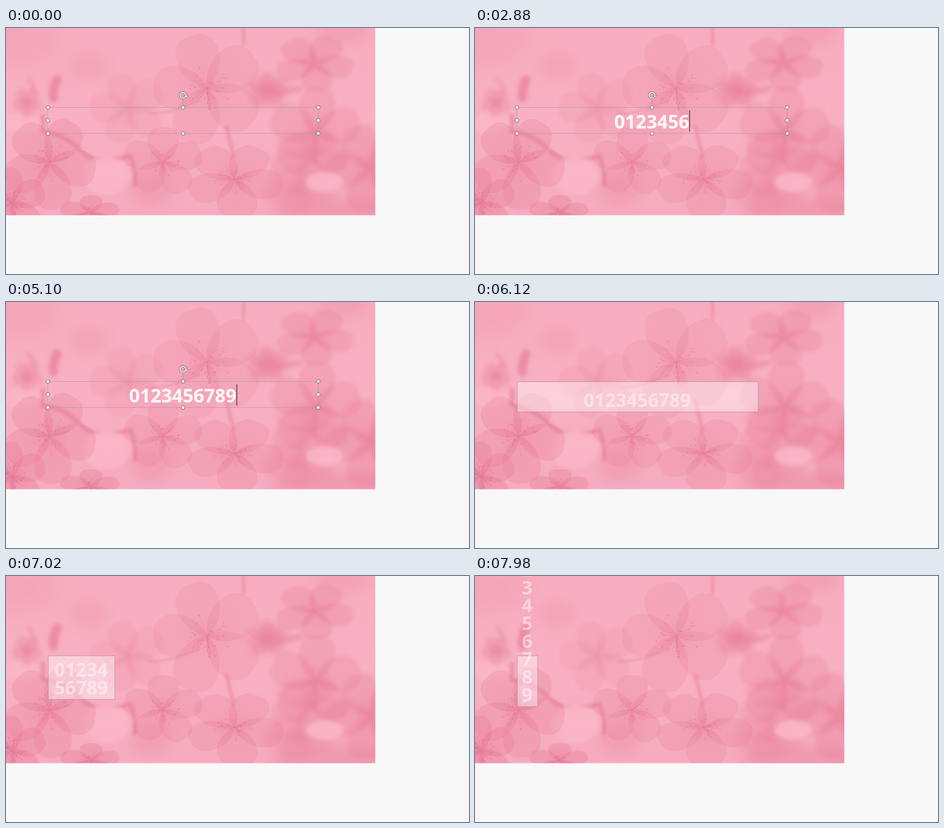
These frames come from a looping animation (1025 by 546 pixels, 8000 ms). An HTML page with a canvas:

```html
<!DOCTYPE html>
<html lang="en">
<head>
<meta charset="utf-8">
<title>Text box wrapping</title>
<style>
  html, body { margin: 0; width: 100%; height: 100%; overflow: hidden; background: #f8f8f8; }
  canvas, svg { position: absolute; left: 0; top: 0; display: block; }
  text { font: bold 41.6px "Open Sans", "Noto Sans", sans-serif; text-anchor: middle; fill: #fffbfb; }
</style>
</head>
<body>
<canvas id="photo" width="818" height="416"></canvas>
<svg width="1025" height="546" viewBox="0 0 1025 546">
  <g id="frame" fill="none" stroke="#a99aa0">
    <rect x="92.5" y="176.5" width="599" height="57.5" stroke-width=".9"/>
    <path d="M392 157V176"/>
    <g id="handles" fill="#fff" stroke="#85787d" stroke-width="1.5"></g>
    <circle cx="391.7" cy="149.3" r="6.3" stroke="#7d7477" stroke-width="4.4"/>
    <circle cx="391.7" cy="149.3" r="6.3" stroke="#fff" stroke-width="2"/>
    <path d="M393.5 149.3H403L398.3 154.3Z" fill="#fff" stroke="#7d7477"/>
  </g>
  <rect id="ghost" x="93.5" y="177" fill="#fff" fill-opacity=".4" stroke="#b48d98"/>
  <g id="lines"></g>
  <rect id="caret" y="183" width="1.5" height="47"/>
</svg>
<script>
const $ = id => document.getElementById(id);

// Soft blossom background
const ctx = $('photo').getContext('2d');
const ROSE = a => `rgba(230,122,149,${a})`;
const LIGHT = 'rgba(250,182,199,.9)';
let seed = 7;
const random = () => (seed = seed * 16807 % 2147483647) / 2147483647;

function glow(x, y, rx, ry, color, blur) {
  ctx.filter = `blur(${blur}px)`;
  ctx.fillStyle = color;
  ctx.beginPath();
  ctx.ellipse(x, y, rx, ry, 0, 0, 7);
  ctx.fill();
}

function branch(d, width, alpha, blur = 3) {
  ctx.filter = `blur(${blur}px)`;
  ctx.strokeStyle = ROSE(alpha);
  ctx.lineWidth = width;
  ctx.lineCap = 'round';
  ctx.stroke(new Path2D(d));
}

function petalPath(length) {
  const side = .53 * length;
  const path = new Path2D();
  path.moveTo(0, 0);
  path.bezierCurveTo(.25 * length, -side, 1.08 * length, -side, length, 0);
  path.bezierCurveTo(1.08 * length, side, .25 * length, side, 0, 0);
  return path;
}

// Five petals shaded from a dark heart, with scattered stamens
function flower(x, y, r, { tilt = 0, squash = 1, blur = .7, strength = .4, stamens = 0 }) {
  const shade = ctx.createRadialGradient(0, 0, 0, 0, 0, r);
  shade.addColorStop(0, ROSE(strength));
  shade.addColorStop(.4, ROSE(strength * .62));
  shade.addColorStop(1, ROSE(strength * .5));
  ctx.save();
  ctx.translate(x, y);
  ctx.scale(1, squash);
  ctx.filter = `blur(${blur}px)`;
  ctx.lineWidth = 1;
  ctx.strokeStyle = ROSE(.1);
  ctx.fillStyle = shade;
  for (let i = 0; i < 5; i++) {
    ctx.save();
    ctx.rotate((tilt + 72 * i) * Math.PI / 180);
    const path = petalPath(r * (.96 + .08 * random()));
    ctx.fill(path);
    ctx.stroke(path);
    ctx.restore();
  }
  ctx.filter = 'blur(.5px)';
  for (let i = 0; i < stamens; i++) {
    const angle = random() * 2 * Math.PI, reach = r * (.08 + .34 * random());
    const px = reach * Math.cos(angle), py = reach * Math.sin(angle);
    ctx.strokeStyle = ROSE(.2);
    ctx.beginPath();
    ctx.moveTo(0, 0);
    ctx.lineTo(px, py);
    ctx.stroke();
    ctx.fillStyle = 'rgba(220,100,130,.45)';
    ctx.beginPath();
    ctx.arc(px, py, 1.5, 0, 7);
    ctx.fill();
  }
  ctx.restore();
}

function paintPhoto() {
  const base = ctx.createLinearGradient(0, 0, 0, 416);
  base.addColorStop(0, '#f7adbf');
  base.addColorStop(.5, '#f8b0c2');
  base.addColorStop(1, '#f6abbe');
  ctx.beginPath();
  ctx.rect(0, 0, 817.5, 415.5);
  ctx.clip();
  ctx.fillStyle = base;
  ctx.fillRect(0, 0, 818, 416);

  // Out of focus
  glow(20, 25, 95, 55, ROSE(.15), 22);
  glow(183, 85, 42, 30, ROSE(.18), 12);
  glow(745, 5, 60, 28, ROSE(.25), 16);
  glow(735, 405, 150, 28, ROSE(.35), 12);
  glow(320, 362, 44, 34, ROSE(.25), 12);
  glow(30, 212, 48, 22, LIGHT, 6);
  flower(270, 178, 80, { tilt: -106, blur: 3, strength: .25 });
  flower(47, 165, 32, { tilt: 20, blur: 5, strength: .55 });
  flower(578, 138, 46, { tilt: -20, squash: .85, blur: 7, strength: .8 });
  flower(645, 358, 80, { tilt: 20, squash: .6, blur: 9, strength: .5 });
  flower(808, 312, 95, { tilt: -112, blur: 5, strength: .55 });
  flower(682, 78, 85, { tilt: 12, squash: .72, blur: 3, strength: .5 });
  flower(670, 285, 85, { tilt: 10, squash: .75, blur: 5, strength: .35 });
  flower(685, 232, 100, { tilt: -86, blur: 3, strength: .45 });
  glow(705, 342, 42, 22, LIGHT, 5);
  branch('M105 155Q104 130 113 115', 20, .65, 4);
  branch('M62 142Q60 125 50 115', 8, .4, 4);
  branch('M82 195V230Q130 235 165 272T275 284Q290 320 285 350', 9, .6);
  branch('M526 0V38', 5, .6);
  branch('M318 190Q380 188 430 160', 4, .4, 2);
  branch('M488 220L504 285', 7, .55);
  branch('M600 145L650 135', 12, .45, 5);
  glow(222, 328, 52, 43, LIGHT, 4);

  // In focus
  flower(446, 133, 122, { tilt: 37, strength: .32, stamens: 36 });
  flower(347, 298, 85, { tilt: 55, squash: .9, strength: .42, stamens: 24 });
  flower(506, 336, 108, { tilt: 85, squash: .76, strength: .4, stamens: 36 });
  flower(97, 298, 105, { tilt: 12, strength: .48, stamens: 28 });
  flower(12, 388, 75, { tilt: -25, strength: .6, stamens: 32 });
  flower(188, 410, 66, { tilt: -90, squash: .6, strength: .6, stamens: 16 });
}
paintPhoto();

// Text box
const LOOP = 8000, STEP = 60, FOCUS = 780, BLINK = 3300, DRAG = 5880;
const LEFT = 93, RIGHT = 691, TOP = 177, BOTTOM = 234;
const ADVANCE = 23.77, LEADING = 39.7, PADDING = 28;

const set = (el, attrs) => { for (const k in attrs) el.setAttribute(k, attrs[k]); };
const show = (el, on) => { el.style.display = on ? '' : 'none'; };
function add(parent, tag, attrs = {}) {
  const el = document.createElementNS('http://www.w3.org/2000/svg', tag);
  set(el, attrs);
  return parent.appendChild(el);
}

for (let i = 0; i < 9; i++)
  if (i !== 4) add($('handles'), 'circle', { cx: 92.8 + i % 3 * 299.3, cy: 176.3 + Math.floor(i / 3) * 28.9, r: 3.9 });

const rows = Array.from({ length: 10 }, () => add($('lines'), 'text'));

// Digits arrive in three bursts of even rhythm
const burst = (start, count, gap) => Array.from({ length: count }, (_, i) => start + i * gap);
const keyTimes = [...burst(1440, 1, 0), ...burst(1680, 3, 150), ...burst(2460, 6, 168)];

// Pointer stops while dragging the corner: time, right edge, bottom edge
const dragPath = [[DRAG, RIGHT, BOTTOM], [6120, 627, 244], [6660, 391, 274],
  [7020, 241, 274], [7500, 174, 281], [7980, 139, 290]];

function dragAt(t) {
  const i = Math.max(1, dragPath.findIndex(stop => stop[0] >= t));
  const a = dragPath[i - 1], b = dragPath[i];
  const u = (t - a[0]) / (b[0] - a[0]);
  return [1, 2].map(k => a[k] + (b[k] - a[k]) * u);
}

function caretOpacity(t) {
  if (t < BLINK) return t < FOCUS ? 0 : 1;
  const wave = Math.cos(Math.PI * (t - 3255) / 510);
  return Math.min(1, Math.max(0, .5 + 2.5 * wave));
}

// The last line stays above the bottom edge; earlier lines stack upwards
function layText(text, perLine, right, bottom) {
  const count = Math.ceil(text.length / perLine);
  const center = (LEFT + right) / 2 - .7;
  rows.forEach((row, i) => {
    row.textContent = text.slice(i * perLine, (i + 1) * perLine);
    set(row, { x: center, y: bottom - 11.3 - Math.max(0, count - 1 - i) * LEADING });
  });
  return center;
}

function render(time) {
  const t = Math.floor(time % LOOP / STEP) * STEP;
  const dragging = t >= DRAG;
  const typed = keyTimes.filter(k => k <= t);
  const text = '0123456789'.slice(0, typed.length);
  show($('frame'), !dragging);
  show($('ghost'), dragging);
  show($('caret'), !dragging);
  set($('lines'), { opacity: dragging ? .5 : 1 });

  if (dragging) {
    const [right, bottom] = dragAt(t);
    const fit = Math.floor((right - LEFT - PADDING) / ADVANCE);
    set($('ghost'), { width: right - LEFT - .5, height: bottom - TOP });
    layText(text, Math.min(10, Math.max(1, fit)), right, bottom);
  } else {
    const center = layText(text, 10, RIGHT, BOTTOM);
    const moving = t - typed[typed.length - 1] < STEP;
    set($('caret'), {
      x: center + typed.length * ADVANCE / 2 - (moving ? 1.2 : 0),
      fill: moving ? '#0d5244' : '#3a2b30',
      opacity: caretOpacity(t)
    });
  }
}

const start = performance.now();
(function tick() {
  render(performance.now() - start);
  requestAnimationFrame(tick);
})();
</script>
</body>
</html>
```
